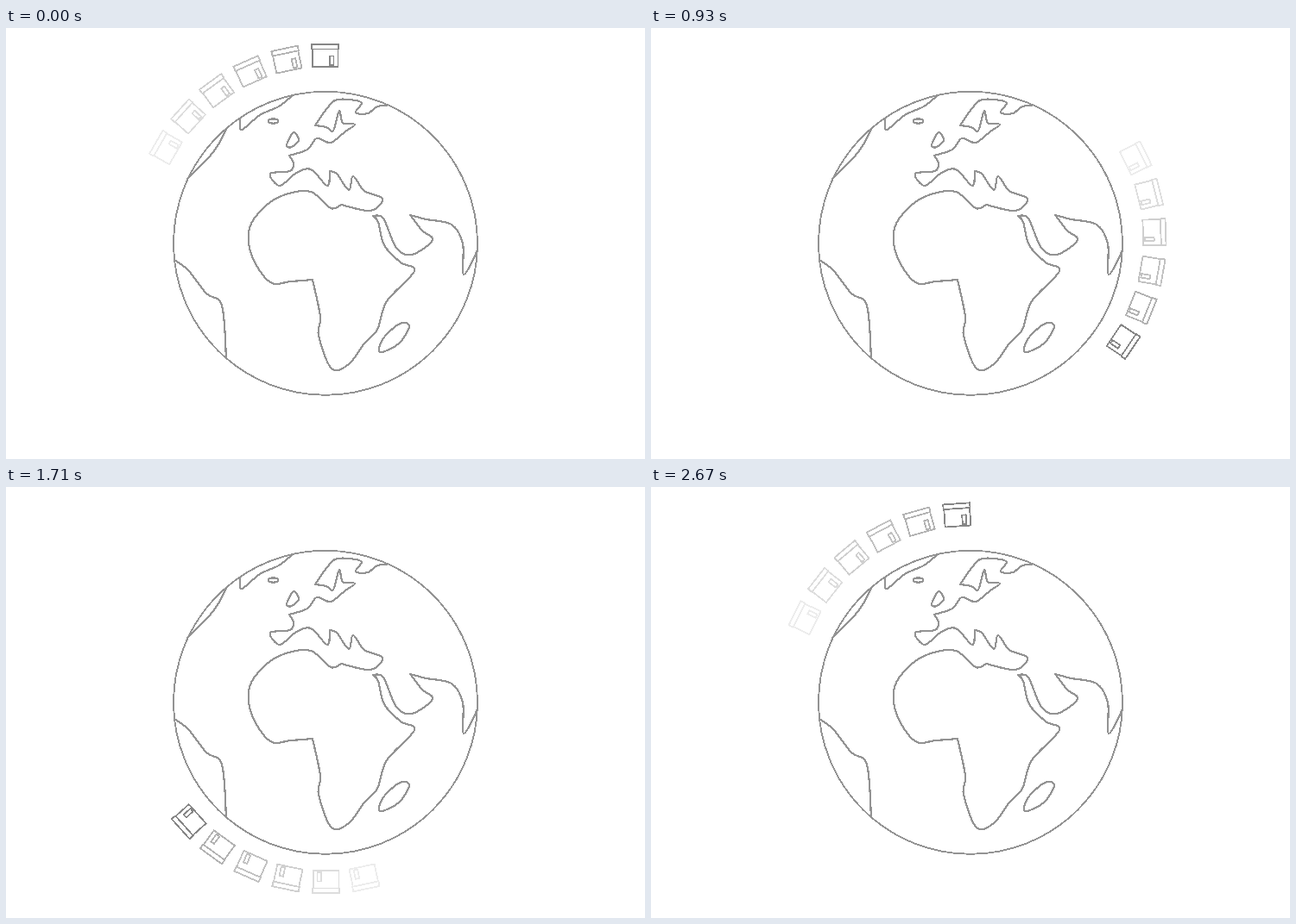
Write an HTML page that moves like this. It is 740x500 px and loops after 2.7 s.

```html
<!DOCTYPE html>
<html lang="en">
<head>
<meta charset="utf-8">
<title>Parcel around the globe</title>
<style>
  html, body { margin: 0; width: 100%; height: 100%; overflow: hidden; background: #fff; }
  svg { display: block; shape-rendering: crispEdges; }
  svg * { fill: none; stroke-linejoin: round; stroke-linecap: round; }
  #globe { stroke: #939393; stroke-width: 2.2; }
  #trail { stroke: #868686; stroke-width: 1.8; }
</style>
</head>
<body>
<svg width="740" height="500" viewBox="0 0 740 500">
  <defs>
    <g id="box">
      <path d="M354 18.8H385V24.5H354ZM354.6 24.5V45H384.4V24.5"/>
      <path d="M375 32.5H379.5V43H375Z"/>
    </g>
  </defs>
  <g id="globe">
    <circle cx="370" cy="249.8" r="176" stroke-width="1.9"/>
    <ellipse cx="309.5" cy="108" rx="6" ry="2.6"/>
  </g>
  <g id="trail"></g>
</svg>
<script>
const LOOP = 2700, STEP = 30, BOXES = 6, SPACING = 12, CENTER = '370 245';
const globe = document.getElementById('globe');
const trail = document.getElementById('trail');

function add(parent, name, attributes) {
  const node = document.createElementNS('http://www.w3.org/2000/svg', name);
  for (const key in attributes) node.setAttribute(key, attributes[key]);
  parent.append(node);
}

// Smooth curve through a few key points (Catmull-Rom as Béziers).
function coast(text, closed = false) {
  const points = text.split(' ').map(pair => pair.split(',').map(Number));
  const n = points.length;
  const at = i => points[closed ? (i + n) % n : Math.max(0, Math.min(n - 1, i))];
  let d = 'M' + points[0];
  for (let i = 0; i < n - (closed ? 0 : 1); i++) {
    const [a, b, c, e] = [at(i - 1), at(i), at(i + 1), at(i + 2)];
    const out = b.map((v, k) => v + (c[k] - a[k]) / 6);
    const into = c.map((v, k) => v - (e[k] - b[k]) / 6);
    d += `C${out} ${into} ${c}`;
  }
  add(globe, 'path', { d });
}

// Europe: Scandinavia, Baltic and North Sea, Iberia and Italy, Balkans and Levant
coast('441,90 430,91 419,99 405,98 411,86 384,83 372,93 358,113');
coast('358,113 371,115 379,119 386,96 390,110 404,112 393,120 376,133 360,128 349,141 328,148');
coast('328,148 333,157 329,166 306,169 317,183 335,169 353,164 372,183 375,166');
coast('375,166 383,169 397,188 402,172 415,189 436,198 422,212 388,205');

// Africa: north-west, then south and east
coast('388,205 376,209 353,190 324,193 300,207 282,232 285,265 306,295 330,294 355,292');
coast('355,292 364,335 362,357 377,395 397,390 415,366 430,350 441,317 473,282 457,272 438,252 431,225 425,218');

// Arabia, then India
coast('425,218 437,221 452,255 470,263 494,246 482,235 468,217');
coast('468,217 487,222 516,228 529,250 530,286 546,258');

// The Americas and Greenland
coast('195,269 211,281 232,308 250,322 255,383');
coast('255,118 240,144 210,175');
coast('331,79 316,91 294,101 273,118 271,105');

// Great Britain and Madagascar
coast('333,121 339,130 331,138 325,136', true);
coast('433,376 437,360 456,343 467,346 455,366', true);

for (let i = 0; i < BOXES; i++) {
  const opacity = i ? 0.75 - 0.12 * i : 1;
  add(trail, 'use', { href: '#box', opacity, transform: `rotate(${-SPACING * i} ${CENTER})` });
}

function draw() {
  const time = Math.floor(performance.now() % LOOP / STEP) * STEP;
  trail.setAttribute('transform', `rotate(${time / LOOP * 360} ${CENTER})`);
  requestAnimationFrame(draw);
}
draw();
</script>
</body>
</html>
```
